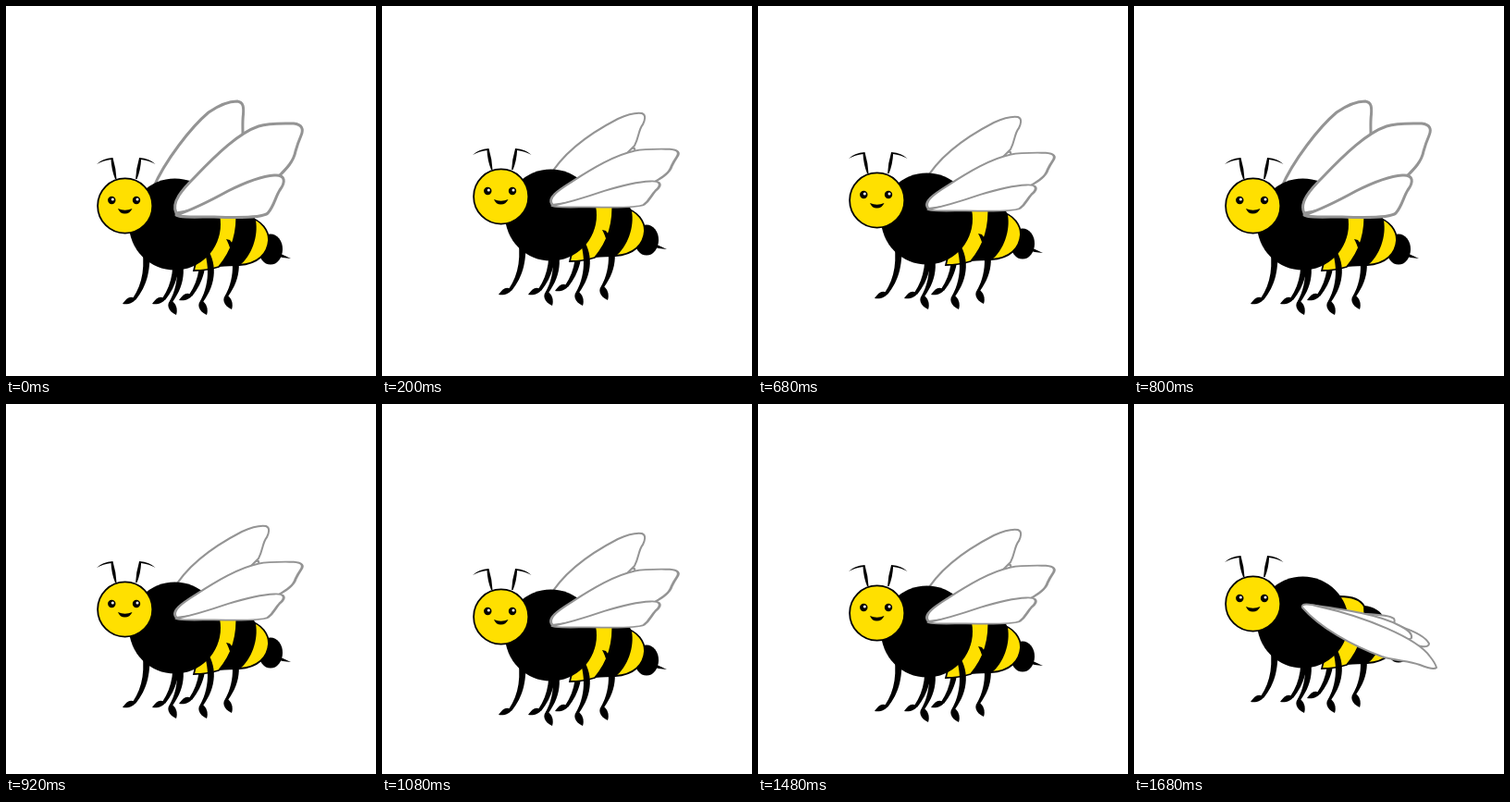
Recreate the animation shown at these times as an HTML page. Size 400 by 400 pixels, loop 1720 ms.

```html
<!DOCTYPE html>
<html>
<head>
<meta charset="utf-8">
<style>
  html, body { margin: 0; width: 100%; height: 100%; overflow: hidden; background: #fff; }
  svg { display: block; width: 100%; height: 100%; }
  .wing { fill: #fff; stroke: #949494; stroke-width: 3; stroke-linejoin: round; }
  .thin { stroke-width: 2; }
  .yellow { fill: #ffe000; stroke: #000; stroke-width: 1.8; }
</style>
</head>
<body>
<svg viewBox="0 0 400 400">
  <defs>
    <g id="frontWing">
      <path d="M184 224C178 212 191 198 205 184C228 160 252 137 273 130C285 126 302 127 311 127C320 128 322 133 319 140C316 147 315 150 313 157C311 168 303 176 296 183Q240 215 184 224Z"/>
      <path d="M184 226C196 222 220 211 240 200C258 191 275 184 290 183C303 182 302 191 296 199C291 207 290 216 283 224C277 229 250 229 225 228C205 228 188 229 184 226Z"/>
    </g>
    <g id="farLeg">
      <path d="M146 256C151 280 148 300 137 316L140 318C153 302 157 285 155 256Z"/>
      <path d="M140 317C135 312 130 316 126 322C132 323 138 321 140 317Z"/>
    </g>
    <g id="nearLeg">
      <path d="M211 258C219 272 222 298 210 319L213 320C228 300 229 276 215 259Z"/>
      <path d="M211 318C206 322 208 330 217 334C219 328 217 321 211 318Z"/>
    </g>
    <path id="antenna" d="M118 187Q114 177 113.500 166Q105 167 98 171Q104 165 115.500 164Q119 176 119.500 187Z"/>
  </defs>

  <g id="bee">
    <g class="wing pose0">
      <path d="M159 197C172 167 200 131 219 115C232 106 241 103 250 103C257 104 257 110 256.500 117C255.500 125 256 131 256 139L225 200Z"/>
    </g>
    <g class="wing thin pose1">
      <path d="M250 176C258 166 266 163 273 164L274 170Z"/>
      <path d="M180 196C195 169 222 149 255 132C266 127 275 125 281 126C286 128 284 134 282 138C277 144 278 152 273 161L260 174L200 205Z"/>
    </g>

    <use href="#farLeg"/>
    <use href="#farLeg" x="32"/>
    <use href="#farLeg" x="61" y="-4"/>

    <ellipse cx="286" cy="263" rx="13" ry="16.500"/>
    <path d="M292 266Q300 269 308 273Q300 273 292 270Z"/>
    <path class="yellow" d="M262 228C277 232 284 243 284 253C283 268 272 279 252 280Z"/>
    <path d="M249 218C259 219 268 224 270 232C273 248 266 270 252 281Q243 281 230 282C244 266 251 242 249 218Z"/>
    <path class="yellow" d="M222 208C238 208 246 213 249 219C251 244 244 266 230 282Q217 286 203 286Z"/>
    <circle cx="182.500" cy="236" r="49.500"/>

    <use href="#nearLeg" x="-33"/>
    <use href="#nearLeg"/>
    <use href="#nearLeg" x="27" y="-6"/>

    <g class="wing pose0"><use href="#frontWing"/></g>
    <g class="wing pose1"><use href="#frontWing" transform="translate(0 86) scale(1 .62)"/></g>
    <g class="wing thin pose2">
      <path d="M250 227Q276 228 281 232Q283 235 279 240Z"/>
      <path d="M240 232C275 234 312 246 319 259C319 264 309 263 296 258Z"/>
      <path d="M190 217C225 222 264 227 288 240C296 244 301 249 300 253C296 256 288 255 278 253Z"/>
      <path d="M182 220C180 215 190 216 200 219C250 230 306 253 320 273C324 278 326 281 327 285C324 288 314 284 309 282C297 277 283 278 268 273C235 261 200 241 182 220Z"/>
    </g>

    <circle class="yellow" cx="128.700" cy="216" r="29.600"/>
    <use href="#antenna"/>
    <use href="#antenna" transform="translate(259.600) scale(-1 1)"/>
    <g id="eye">
      <circle cx="114.300" cy="210" r="4.200"/>
      <circle cx="115.300" cy="209" r="1.500" fill="#fff"/>
    </g>
    <use href="#eye" x="26.700"/>
    <path d="M121 219Q128.500 222.500 136.500 219Q134 224.500 128.500 224.500Q123 224.500 121 219Z"/>
  </g>
</svg>
<script>
  const FRAME = 40, FRAMES = 43, SPEED = 2;
  const bee = document.getElementById('bee');
  const wings = [0, 1, 2].map(p => document.querySelectorAll('.pose' + p));

  // Rise for 10 steps, sink until step 31, rise back to the start
  const height = n => SPEED * (n <= 10 ? -n : n <= 31 ? n - 20 : 42 - n);

  function draw(now) {
    const n = Math.floor(now / FRAME) % FRAMES;
    const pose = 2 - Math.abs(n % 4 - 2);  // wings up, level, down, level
    bee.setAttribute('transform', `translate(0 ${height(n)})`);
    wings.forEach((parts, p) => parts.forEach(w => w.style.display = p === pose ? '' : 'none'));
  }

  const start = performance.now();
  function tick() {
    draw(performance.now() - start);
    requestAnimationFrame(tick);
  }
  draw(0);
  requestAnimationFrame(tick);
</script>
</body>
</html>
```
